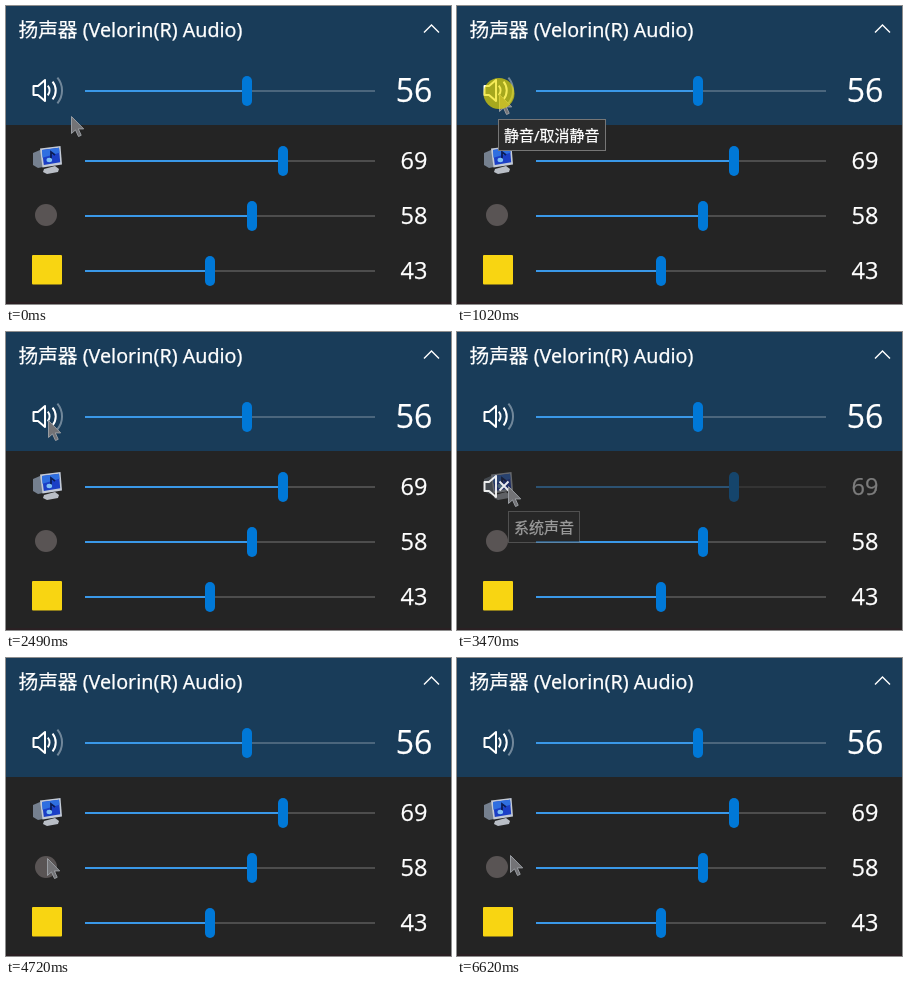
These frames come from a looping animation (445 px wide and 298 px high, 6.64 s). An HTML page:

```html
<!DOCTYPE html>
<html lang="zh">
<head>
<meta charset="utf-8">
<title>Volume mixer</title>
<style>
  html, body { margin: 0; width: 100%; height: 100%; overflow: hidden; background: #242424; }
  svg { display: block; width: 445px; height: 298px; }
  text { font-family: "Noto Sans", "Noto Sans CJK SC", "Noto Sans CJK", sans-serif; fill: #fff; stroke: #fff; stroke-width: .25px; }
  .num { font-family: "Open Sans", "Noto Sans", sans-serif; text-anchor: middle; }
</style>
</head>
<body>
<svg id="stage" viewBox="0 0 445 298">
  <defs>
    <path id="horn" d="M27.5 -5h4.5l7 -6v21l-7 -6h-4.5z" fill="none" stroke="#fff" stroke-width="2" stroke-linejoin="round"/>
    <path id="cross" d="M42.5 -5.5l9 9m0 -9l-9 9" stroke="#fff" stroke-width="1.9" fill="none"/>
  </defs>
  <rect width="445" height="298" fill="#242424"/>
  <rect width="445" height="119" fill="#193c59"/>
  <rect y="296" width="445" height="2" fill="#2a2023"/>
  <text x="12.5" y="30.5" font-size="19.7">扬声器 (Velorin(R) Audio)</text>
  <path d="M418 26.5l7.5 -7.5l7.5 7.5" fill="none" stroke="#fff" stroke-width="1.4"/>
  <g id="rows"></g>
  <g id="tips"></g>
  <path id="cursor" d="M.5 .5v17l4 -3.6l3 6.6l2.7 -1.2l-2.9 -6.4h5.4z" fill="#737376" stroke="#999da2" stroke-linejoin="round"/>
  <circle id="ring" r="15.5" fill="#f0e000"/>
</svg>
<script>
const LOOP = 6640;
const $ = id => document.getElementById(id);

const arc = (r, color) => {
  const dx = r * .77, dy = r * .64;
  return `<path d="M${36 + dx} ${-.5 - dy}A${r} ${r} 0 0 1 ${36 + dx} ${-.5 + dy}" fill="none" stroke="${color}" stroke-width="2"/>`;
};

const icons = [
  `<g class="waves">${arc(7.5, '#fff')}${arc(13.7, '#fff')}${arc(20, '#71879a')}</g>`,
  `<path d="M27 -8l7 -3l3 2v15l-5 1l-5 -3z" fill="#75808f"/>
   <path d="M38 8l11 -3l4 3l-1 3l-11 2l-4 -2z" fill="#b9bec6"/>
   <path d="M34 -12.5l20.5 -2.5l1.5 18.5l-19.5 3z" fill="#c3cad6"/>
   <path d="M36 -11l17 -2.2l1.2 14.5l-16.4 2.6z" fill="#1b3fc6"/>
   <path d="M36 -11l17 -2.2l.5 5l-17 5z" fill="#2f6fe0"/>
   <path d="M45 0v-9l4 3" fill="none" stroke="#0c1c58" stroke-width="1.8"/>
   <ellipse cx="43.3" cy="-1" rx="2.8" ry="2.2" fill="#7fc0f5"/>`,
  '<circle cx="40" cy="-1" r="11" fill="#595454"/>',
  '<rect x="26" y="-16" width="30" height="29.5" rx="1" fill="#f8d512"/>'
];

const rows = [
  { y: 85, value: 56, size: 32, base: 95.7, rest: '#4b667d', mutes: [1120, 1990] },
  { y: 155, value: 69, rest: '#4d4d4d', mutes: [3380, 4220] },
  { y: 210, value: 58, rest: '#4d4d4d', mutes: [4950, 5620] },
  { y: 265, value: 43, rest: '#4d4d4d', mutes: [-1, -1] }
];

rows.forEach((row, i) => {
  const x = Math.round(84 + 2.8 * row.value);
  const horn = '<use href="#horn"/>';
  $('rows').insertAdjacentHTML('beforeend', `<g transform="translate(0 ${row.y})">
    <g class="icon">${icons[i]}</g>
    ${i ? '' : horn}
    <g class="mute">${i ? horn : ''}<use href="#cross"/></g>
    <g class="level">
      <rect x="79" y="-1" width="290" height="2" fill="${row.rest}"/>
      <rect x="79" y="-1" width="${x - 79}" height="2" fill="#3a98e8"/>
      <rect x="${x - 5}" y="-15" width="10" height="30" rx="5" fill="#0078d7"/>
      <text class="num" x="408" y="${(row.base || row.y + 7.7) - row.y}" font-size="${row.size || 23.5}">${row.value}</text>
    </g></g>`);
  const el = $('rows').lastElementChild;
  for (const part of ['icon', 'mute', 'level']) row[part] = el.querySelector('.' + part);
});

// Tooltips: fade in from `show`, fade out from `hide`
const tips = [
  { x: 41, y: 113, w: 108, text: '静音/取消静音', show: 660, hide: 1100 },
  { x: 51, y: 179, w: 72, text: '系统声音', show: 3400, hide: 3710 }
];

for (const tip of tips) {
  $('tips').insertAdjacentHTML('beforeend', `<g transform="translate(${tip.x} ${tip.y})">
    <rect x=".5" y=".5" width="${tip.w - 1}" height="31" fill="#2b2b2b" stroke="#767676"/>
    <text x="6" y="21.5" font-size="15">${tip.text}</text></g>`);
  tip.el = $('tips').lastElementChild;
}

// Cursor stops: time, x, y
const stops = [
  [0, 65, 110], [20, 65, 110], [360, 42, 88], [2510, 42, 88], [3160, 51, 154],
  [4280, 51, 154], [4620, 41, 200], [4720, 41, 200], [4800, 41, 211], [5840, 41, 211],
  [6150, 38, 209], [6500, 46, 204], [6520, 46, 204], [6620, 53, 197], [LOOP, 53, 197]
];

// Mouse presses: start, end
const clicks = [[920, 1200], [1830, 2060], [3180, 3420], [4050, 4280], [4790, 5010], [5465, 5670]];

const clamp = v => Math.max(0, Math.min(1, v));
const ramp = (t, a, d) => clamp((t - a) / d);
const pulse = (t, a, b, rise, fall) => Math.min(ramp(t, a, rise), 1 - ramp(t, b, fall));

function cursorAt(t) {
  const i = Math.max(1, stops.findIndex(s => t < s[0]));
  const [t0, x0, y0] = stops[i - 1], [t1, x1, y1] = stops[i];
  const p = ramp(t, t0, t1 - t0), k = p * p * (3 - 2 * p);
  return [x0 + (x1 - x0) * k, y0 + (y1 - y0) * k];
}

function draw(t) {
  rows.forEach((row, i) => {
    const muted = t >= row.mutes[0] && t < row.mutes[1];
    row.icon.setAttribute('opacity', muted ? (i ? .4 : 0) : 1);
    row.mute.setAttribute('opacity', muted ? .9 : 0);
    row.level.setAttribute('opacity', muted && i ? .4 : 1);
  });
  for (const tip of tips) tip.el.setAttribute('opacity', pulse(t, tip.show, tip.hide, 130, 130));

  const [x, y] = cursorAt(t);
  $('cursor').setAttribute('transform', `translate(${x} ${y})`);
  $('ring').setAttribute('cx', x);
  $('ring').setAttribute('cy', y - .5);
  const press = Math.max(...clicks.map(([a, b]) => pulse(t, a, b - 100, 60, 100)));
  $('ring').setAttribute('opacity', .66 * press);
}

const start = performance.now();
function tick() {
  draw((performance.now() - start) % LOOP);
  requestAnimationFrame(tick);
}
draw(0);
requestAnimationFrame(tick);
</script>
</body>
</html>
```
